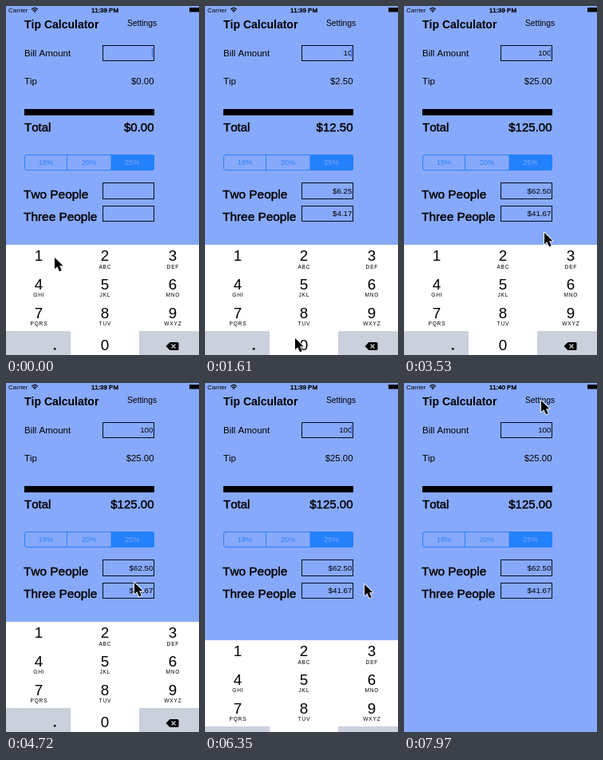
Recreate the animation shown at these times as an HTML page. Size 242 by 437 pixels, loop 8 s.

```html
<!DOCTYPE html>
<html lang="en">
<head>
<meta charset="utf-8">
<title>Tip Calculator</title>
<style>
html, body { margin: 0; width: 100%; height: 100%; overflow: hidden; background: #87a9fb; }
svg { display: block; width: 100vw; height: 100vh; }
text { font-family: "Liberation Sans", Arial, sans-serif; font-kerning: none; white-space: pre; }
.medium { stroke: #000; stroke-width: .45; }
</style>
</head>
<body>
<svg id="stage" viewBox="0 0 242 437"></svg>
<script>
const LOOP = 8000;
const BLUE = '#2b82fa', BACK = '#87a9fb', GREY = '#cad0dc';
const stage = document.getElementById('stage');

function add(parent, tag, attrs, content) {
  const el = document.createElementNS('http://www.w3.org/2000/svg', tag);
  for (const k in attrs) el.setAttribute(k, attrs[k]);
  if (content !== undefined) el.textContent = content;
  parent.appendChild(el);
  return el;
}
const rect = (parent, x, y, width, height, fill, more) =>
  add(parent, 'rect', { x, y, width, height, fill, ...more });
const label = (parent, x, y, size, str, more) =>
  add(parent, 'text', { x, y, 'font-size': size, ...more }, str);

const middle = { 'text-anchor': 'middle' };
const right = { 'text-anchor': 'end' };
const medium = { class: 'medium' };

rect(stage, 0, 0, 242, 437, BACK);

// Status bar
label(stage, 3, 8, 8, 'Carrier');
const wifi = add(stage, 'g', { fill: 'none', stroke: '#000', 'stroke-width': 1.1 });
add(wifi, 'path', { d: 'M32 4.3Q36 .6 40 4.3M33.7 6Q36 3.9 38.3 6' });
add(wifi, 'circle', { cx: 36, cy: 7.2, r: .9, fill: '#000', stroke: 'none' });
const clock = label(stage, 124, 8, 8, '', { ...middle, class: 'medium', 'stroke-width': .3 });
rect(stage, 230, 2, 12, 5.5, '#000');

// Form
label(stage, 23, 28, 14, 'Tip Calculator', { 'font-weight': 'bold' });
label(stage, 152, 25, 10.3, 'Settings');
label(stage, 23, 63, 11.5, 'Bill Amount');
label(stage, 23, 98, 11.5, 'Tip');
const tip = label(stage, 185.5, 98, 11.4, '', right);
rect(stage, 23, 129, 163, 8, '#000');
label(stage, 23, 157, 15, 'Total', medium);
const total = label(stage, 185.5, 157, 15, '', { ...right, ...medium });
label(stage, 22, 241, 15.4, 'Two People', medium);
label(stage, 22, 268.5, 15.4, 'Three People', medium);

function field(y, height, base) {
  rect(stage, 121.5, y, 64, height, 'none', { stroke: '#000b24' });
  return label(stage, 184.5, base, 9.8, '', right);
}
const bill = field(49.5, 19, 62);
const two = field(221.5, 20, 235);
const three = field(250.5, 19, 263);
const caret = rect(stage, 183, 53, 1, 11, '#3464e8');

// Tip rate segments
rect(stage, 23.5, 186.5, 162, 19, 'none', { rx: 2.5, stroke: BLUE });
add(stage, 'path', { d: 'M131.5 186H183a3 3 0 0 1 3 3v14a3 3 0 0 1-3 3H131.5z', fill: '#2381fb' });
rect(stage, 76, 187, 1, 18, BLUE);
['18%', '20%', '25%'].forEach((s, i) =>
  label(stage, 50 + i * 54.2, 199, 9.2, s, { ...middle, fill: i === 2 ? BACK : BLUE }));

// Keypad
const pad = add(stage, 'g', {});
rect(pad, 0, 299, 242, 138, '#fff');
const left = [0, 81, 167, 242], mid = [41, 124, 209];
const letters = ['', 'ABC', 'DEF', 'GHI', 'JKL', 'MNO', 'PQRS', 'TUV', 'WXYZ'];
const top0 = r => 299 + r * 36;
const key = (col, row, fill) =>
  rect(pad, left[col], top0(row), left[col + 1] - left[col], row === 3 ? 30 : 36, fill);
key(0, 3, GREY);
key(2, 3, GREY);
const pressOne = key(0, 0, GREY), pressZero = key(1, 3, GREY);
letters.forEach((s, i) => {
  const col = i % 3, y = 319.3 + Math.floor(i / 3) * 35.8;
  label(pad, mid[col], y, 18.8, i + 1, middle);
  label(pad, mid[col] + .4, y + 9.2, 6.6, s, { ...middle, 'letter-spacing': .8 });
});
label(pad, 124, 431.3, 18.8, '0', middle);
add(pad, 'circle', { cx: 61.2, cy: 429.3, r: 1.4 });
add(pad, 'path', { d: 'M200.5 426l5-5H215q1.5 0 1.5 1.5v7q0 1.5-1.5 1.5h-9.500z' });
add(pad, 'path', { d: 'M207.500 423.500l5 5m0-5l-5 5', stroke: GREY, 'stroke-width': 1.2 });

// Pointer
const pointer = add(stage, 'g', {});
const arrow = 'M0 0V14.200L3.300 11.200 6 17.200 8.700 16 6.100 10.300H10.500Z';
add(pointer, 'path', { d: arrow, transform: 'translate(.6 1)', opacity: .25 });
add(pointer, 'path', {
  d: arrow, stroke: '#fff', 'stroke-width': 1.8, 'stroke-linejoin': 'round', 'paint-order': 'stroke'
});

// Pointer stops: time, x, y
const path = [
  [0, 61, 315], [480, 61, 315], [1120, 113, 416], [2100, 113, 416], [2360, 108, 396],
  [2700, 108, 396], [3500, 176, 284], [4050, 176, 284], [4360, 168, 359], [4720, 161, 250],
  [5500, 161, 250], [5900, 200, 252], [6380, 200, 252], [6780, 144, 351],
  [7420, 144, 351], [7660, 141, 215], [7850, 177, 4], [7960, 172, 22], [LOOP, 172, 22]
];
const clamp = v => Math.max(0, Math.min(1, v));
const smooth = v => v * v * (3 - 2 * v);

function pointerAt(t) {
  const i = path.findIndex(p => p[0] > t);
  const a = path[i - 1], b = path[i];
  const k = smooth((t - a[0]) / (b[0] - a[0]));
  return [a[1] + (b[1] - a[1]) * k, a[2] + (b[2] - a[2]) * k];
}

// Halves round down, so 0.625 shows as 0.62
const money = v => '$' + (Math.ceil(v * 100 - .5 - 1e-9) / 100).toFixed(2);
const set = (el, s) => { if (el.textContent !== s) el.textContent = s; };
const show = (el, on) => el.setAttribute('opacity', +on);
const between = (t, a, b) => t >= a && t < b;

function caretAt(t) {
  if (t > 6400) return 0;
  if (t < 3000) return 1;
  const wave = Math.cos((t - 3380) / 1000 * Math.PI * 2);
  return clamp(.5 + wave * 1.6);
}

function draw(t) {
  const amount = t < 290 ? 0 : t < 1440 ? 1 : t < 1900 ? 10 : 100;
  set(bill, amount ? String(amount) : '');
  set(tip, money(amount * .25));
  set(total, money(amount * 1.25));
  set(two, amount ? money(amount * 1.25 / 2) : '');
  set(three, amount ? money(amount * 1.25 / 3) : '');
  set(clock, t < 6500 ? '11:39 PM' : '11:40 PM');
  show(pressOne, between(t, 150, 300));
  show(pressZero, between(t, 1310, 1460) || between(t, 1760, 1910));
  show(caret, caretAt(t));
  const slide = 1 - (1 - clamp((t - 6320) / 360)) ** 2;
  pad.setAttribute('transform', `translate(0 ${slide * 140})`);
  pointer.setAttribute('transform', `translate(${pointerAt(t)})`);
}

const start = performance.now();
function tick() {
  draw((performance.now() - start) % LOOP);
  requestAnimationFrame(tick);
}
tick();
</script>
</body>
</html>
```
